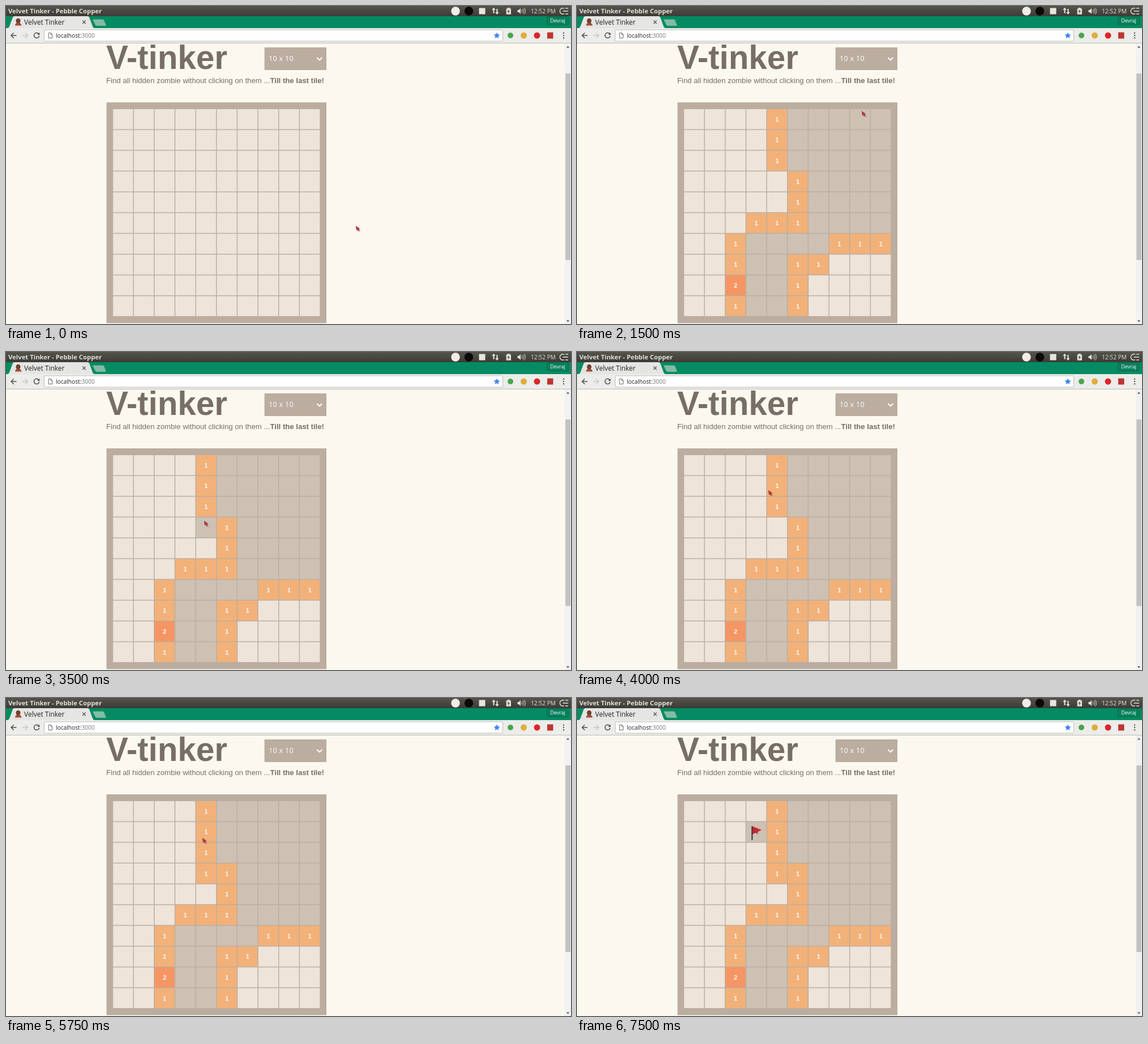
Animation of 998 by 561 pixels, one loop 8 s. Source, as an HTML page:

```html
<!DOCTYPE html>
<html lang="en">
<head>
<meta charset="utf-8">
<title>Velvet Tinker</title>
<style>
html, body { margin: 0; width: 100%; height: 100%; overflow: hidden; background: #fbf8ef; }
svg { display: block; width: 998px; height: 561px; }
.ui { font-family: "Open Sans", "Noto Sans", sans-serif; }
.page { font-family: "Liberation Sans", Arial, sans-serif; fill: #776e65; }
.num { font: bold 11.3px "Liberation Sans", Arial, sans-serif; fill: #f9f6f2; text-anchor: middle; }
.line { fill: none; stroke-linecap: round; stroke-linejoin: round; }
</style>
</head>
<body>
<svg id="stage" viewBox="0 0 998 561" xmlns="http://www.w3.org/2000/svg">
  <defs>
    <linearGradient id="bar" x2="0" y2="1">
      <stop offset="0" stop-color="#55534c"/><stop offset="1" stop-color="#3c3b37"/>
    </linearGradient>
  </defs>
  <rect width="998" height="561" fill="#fbf8ef"/>

  <g class="page">
    <text x="177" y="111" font-size="58.3" font-weight="bold">V-tinker</text>
    <text y="136" font-size="13.15"><tspan x="177">Find all hidden zombie without clicking on them ...</tspan><tspan x="466.5" font-weight="bold">Till the last tile!</tspan></text>
  </g>
  <rect x="456.5" y="73" width="109.5" height="40" rx="1" fill="#bbada0"/>
  <text class="ui" x="464" y="97" font-size="12.5" letter-spacing=".35" fill="#fff">10 x 10</text>
  <path class="line" d="M549.8 91.5l4 4 4-4" stroke="#fff" stroke-width="2"/>
  <rect x="177.5" y="170" width="388.5" height="389.5" rx="1" fill="#bbada0"/>
  <g id="board"></g>

  <!-- scrollbar -->
  <rect x="987" y="66" width="11" height="495" fill="#f1f1f1"/>
  <rect x="988.3" y="119" width="8.7" height="329" fill="#c1c1c1"/>
  <path d="M989.8 73.5l2.7-3 2.7 3zM989.8 554.5l2.7 3 2.7-3z" fill="#505050"/>

  <!-- title bar -->
  <rect width="998" height="18" fill="url(#bar)"/>
  <text class="ui" x="4" y="12.7" font-size="11.3" font-weight="bold" fill="#e4e0d8">Velvet Tinker - Pebble Copper</text>
  <circle cx="794" cy="9" r="7.7" fill="#f1ece8"/>
  <circle cx="817.5" cy="9" r="7.7" fill="#0c0a09"/>
  <rect x="835.5" y="3.5" width="11" height="11" fill="#e8e5df"/>
  <g fill="#e4e0d8">
    <path d="M861.5 2.8l3.4 4h-2.3v6h-2.2v-6h-2.3zM867.4 15l-3.4-4h2.3v-6h2.2v6h2.3z"/>
    <path fill-rule="evenodd" d="M885.8 3h4v1.4h2.2v10.400h-8.400V4.400h2.200zM888.600 5.800l-3.200 4h2l-.8 3.400 3.400-4.200h-2.100z"/>
    <path d="M903.500 7h2.300l3.200-3v10l-3.200-3h-2.300z"/>
    <text class="ui" x="927" y="12.700" font-size="10.200">12:52 PM</text>
  </g>
  <path class="line" d="M911 6.800q1.700 2.200 0 4.400M913.300 5.200q3 3.800 0 7.600M915.600 3.800q4 5.200 0 10.400" stroke="#bcb8b0" stroke-width="1.200"/>
  <path class="line" d="M985.500 4.200a5.200 5.200 0 1 0 0 9.600M984 9h4.500M988.500 4h4M989.500 9h3M988.500 14h4" stroke="#e4e0d8" stroke-width="1.400"/>

  <!-- tab strip -->
  <rect y="18" width="998" height="21" fill="#048b62"/>
  <path d="M3 39q2-.5 3-3l5.500-15q1-3 3.500-3h129q2.500 0 3.500 3l5.500 15q1 2.500 3 3z" fill="#e5e5e3"/>
  <path d="M154 23.500h17q1.500 0 2.200 1.500l3.400 8.500q.5 1.500-1 1.500h-15.600q-1.500 0-2.200-1.500l-4.300-8.500q-.6-1.500.500-1.500z" fill="#82bca6" stroke="#3d9b7c" stroke-width=".7"/>
  <path d="M16 34.500q.3-5 5.500-5t6 5z" fill="#a64b35"/>
  <ellipse cx="21.500" cy="26.300" rx="4" ry="4.500" fill="#70402f"/>
  <text class="ui" x="32" y="32.500" font-size="12" fill="#222">Velvet Tinker</text>
  <path class="line" d="M135.700 26l4.600 4.800m0-4.800l-4.600 4.800" stroke="#555" stroke-width="1.300"/>
  <rect x="955.500" y="18.500" width="38" height="15" rx="1.500" fill="#077f5b" stroke="#0a6e50"/>
  <text class="ui" x="974.500" y="29.300" font-size="9" text-anchor="middle" fill="#fff">Devraj</text>

  <!-- toolbar -->
  <rect y="39" width="998" height="27" fill="#ececea"/>
  <path d="M0 65.500h998" stroke="#bdbbb7"/>
  <rect x="67.500" y="42" width="810" height="20" rx="1.500" fill="#fff" stroke="#bcbcba"/>
  <g class="line" stroke-width="1.500">
    <path d="M18 52H9m4.300-4.300L9 52l4.300 4.300" stroke="#4d4d4d"/>
    <path d="M29.500 52h9m-4.300-4.300l4.300 4.300-4.300 4.300" stroke="#c8c8c6"/>
    <path d="M57.800 49.200a4.600 4.600 0 1 0 .7 4" stroke="#4d4d4d"/>
    <path d="M75.500 47.500h3.500l2.500 2.500v6.500h-6zM79 47.500V50h2.500" stroke="#6a6a6a" stroke-width="1"/>
  </g>
  <path d="M59.300 46.800v4.200h-4.200z" fill="#4d4d4d"/>
  <text class="ui" x="88" y="55.500" font-size="10.200" fill="#222">localhost:<tspan fill="#777">3000</tspan></text>
  <path d="M867 46.400l1.600 3.700 4 .4-3 2.700.9 3.900-3.500-2-3.500 2 .9-3.900-3-2.700 4-.4z" fill="#4285f4"/>
  <circle cx="891" cy="52" r="5" fill="#4aa64a"/>
  <circle cx="914.500" cy="52" r="5.500" fill="#dfae3a"/>
  <circle cx="938" cy="52" r="5.500" fill="#dd2528"/>
  <rect x="956" y="46.500" width="10.500" height="11" fill="#bd3430"/>
  <g fill="#555"><circle cx="985" cy="47.800" r="1.200"/><circle cx="985" cy="52" r="1.200"/><circle cx="985" cy="56.200" r="1.200"/></g>

  <g id="flag">
    <path d="M309.500 226.200l16.800 6.600-16.800 8z" fill="#d9272a"/>
    <path d="M313 231l4 1.500M313 235.500l5-1" stroke="#a81f2b"/>
    <path d="M309.300 226v24.500" stroke="#2f2d55" stroke-width="2"/>
  </g>
  <g id="cursor">
    <path d="M2 2l7 5-2.500.6 1.700 3-1.700.6-1.800-3L3 10z" fill="#5a4a40" opacity=".28"/>
    <path d="M.3.300l6.300 4.500-2.300.6 1.600 2.900-1.600.7-1.500-2.900L1.200 7.600z" fill="#c92f36" stroke="#7d3436" stroke-width=".6"/>
  </g>
</svg>
<script>
const LOOP = 8000, STEP = 250;
const LEFT = 189.2, TOP = 182, PITCH = 36.65, SIZE = 35.2;
const HIDDEN = '#eee4da', OPEN = '#cdc1b4', ONE = '#f2b179', TWO = '#f59563';

// dot: covered tile, blank: open tile, digit: neighbour count
const layout = [
  '....1     ', '....1     ', '....1     ', '.....1    ', '.....1    ',
  '...111    ', '..1    111', '..1  11...', '..2  1....', '..1  1....'
];
const OPENED = 1500, CLICKED = 5250, FLAGGED = 7250;

// pointer tip: time, x, y
const path = [
  [0, 618, 388], [250, 596, 318], [500, 556, 232], [750, 490, 143], [1000, 424, 158],
  [1250, 503, 185], [1750, 503, 186], [2000, 476, 198], [2500, 378, 228], [3000, 305, 253],
  [3250, 322, 268], [3500, 350, 298], [3750, 364, 286], [4000, 338, 244], [4250, 323, 240],
  [4500, 330, 247], [4750, 341, 273], [5000, 351, 303], [5250, 352, 302], [5500, 354, 276],
  [5750, 347, 247], [6000, 331, 240], [6250, 319, 233], [6500, 313, 230], [8000, 313, 230]
];

const $ = id => document.getElementById(id);
const board = $('board'), cursor = $('cursor'), flag = $('flag');

function add(tag, attrs) {
  const el = document.createElementNS('http://www.w3.org/2000/svg', tag);
  for (const key in attrs) el.setAttribute(key, attrs[key]);
  return board.appendChild(el);
}

const tiles = [];
for (let row = 0; row < 10; row++) {
  for (let col = 0; col < 10; col++) {
    const x = LEFT + col * PITCH, y = TOP + row * PITCH;
    const late = row === 3 && col === 4;
    const mark = late ? '1' : layout[row][col];
    tiles.push({
      row, col, mark,
      opens: mark === '.' ? Infinity : late ? CLICKED : OPENED,
      box: add('rect', { x, y, width: SIZE, height: SIZE }),
      label: add('text', { class: 'num', x: x + SIZE / 2, y: y + SIZE / 2 + 4.2 })
    });
  }
}

function tipAt(t) {
  let i = 1;
  while (path[i][0] < t) i++;
  const [t0, x0, y0] = path[i - 1], [t1, x1, y1] = path[i];
  const k = (t - t0) / (t1 - t0);
  return [x0 + (x1 - x0) * k, y0 + (y1 - y0) * k];
}

function render(ms) {
  const t = Math.floor((ms % LOOP) / STEP) * STEP;
  const [x, y] = tipAt(t);
  const col = Math.floor((x - LEFT) / PITCH), row = Math.floor((y - TOP) / PITCH);
  for (const tile of tiles) {
    const open = t >= tile.opens;
    const hover = tile.row === row && tile.col === col;
    const color = !open ? (hover ? OPEN : HIDDEN)
      : tile.mark === '1' ? ONE : tile.mark === '2' ? TWO : OPEN;
    tile.box.setAttribute('fill', color);
    tile.label.textContent = open ? tile.mark.trim() : '';
  }
  flag.setAttribute('visibility', t >= FLAGGED ? 'visible' : 'hidden');
  cursor.setAttribute('transform', `translate(${x} ${y})`);
}

const start = performance.now();
function tick() {
  render(performance.now() - start);
  requestAnimationFrame(tick);
}
tick();
</script>
</body>
</html>
```
